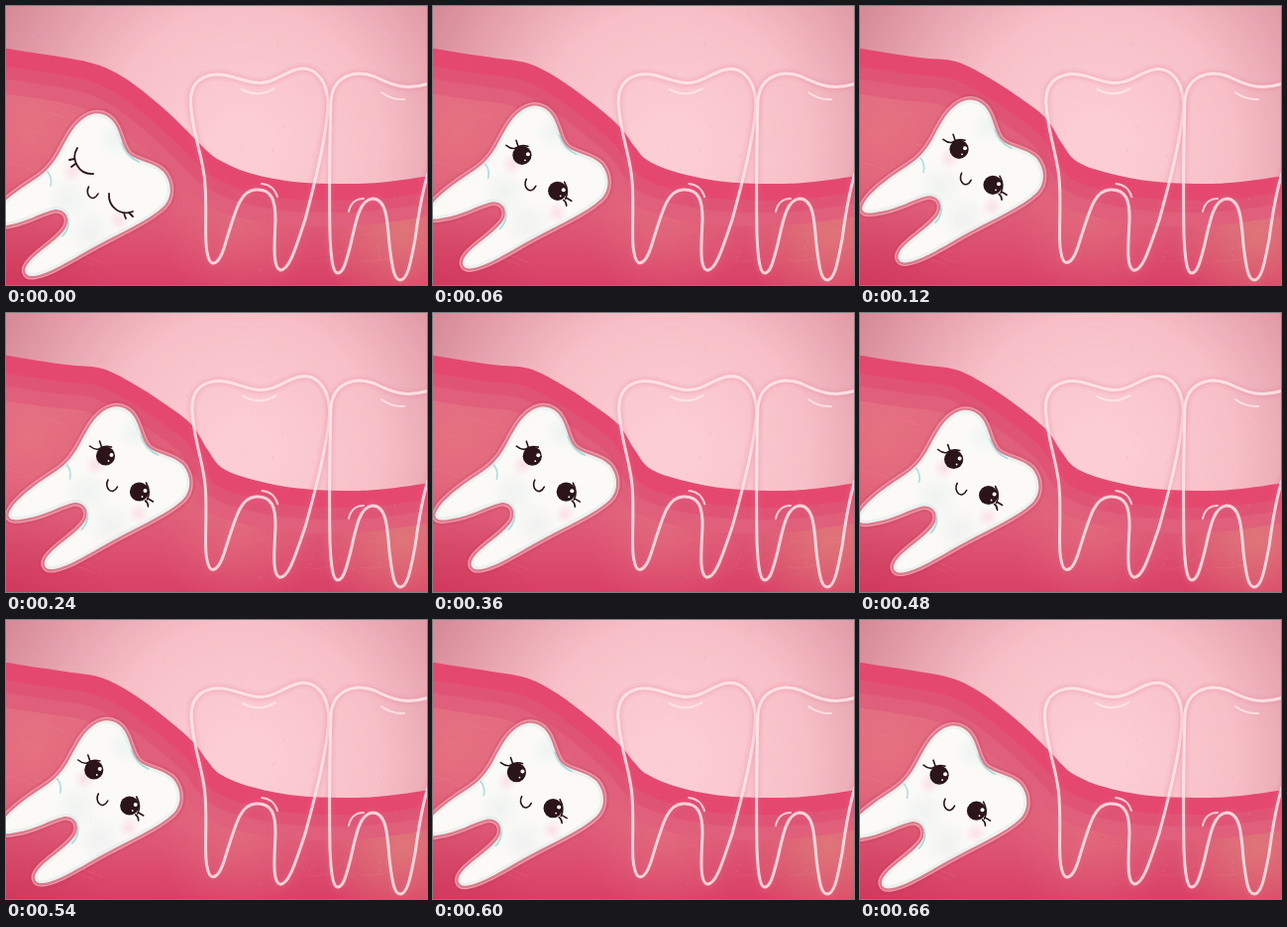
Write an HTML page with a canvas that moves like this. It is 425 px wide and 281 px high and loops after 0.69 s.

```html
<!DOCTYPE html>
<html>
<head>
<meta charset="utf-8">
<style>
  html, body { margin: 0; width: 100%; height: 100%; overflow: hidden; background: #f3b3bc; }
  canvas { display: block; width: 425px; height: 281px; }
</style>
</head>
<body>
<canvas id="stage" width="425" height="281"></canvas>
<script>
const W = 425, H = 281, LOOP = 690, STEP = 30;
const ctx = document.getElementById('stage').getContext('2d');

// How far the tooth has pushed up, as [time, amount]
const push = [[0, 0], [60, .55], [120, .98], [240, 1], [360, .99], [420, .92], [480, .75], [540, .5], [660, .13], [690, 0]];

const gumRest = [[-30, 38], [20, 46], [60, 52], [95, 60], [125, 76], [160, 104], [190, 133], [203, 146], [215, 155], [245, 168], [290, 177], [340, 179], [385, 177], [455, 167]];
const gumPushed = [[-30, 38], [20, 46], [60, 52], [97, 56], [128, 71], [158, 90], [187, 112], [203, 137], [218, 156], [246, 167], [290, 176], [340, 179], [385, 177], [455, 167]];

const ghostA = new Path2D('M203 248Q205 259 209 259Q215 259 220 244C232 205 236 186 252 185C268 184 272 195 272 215C271 240 269 264 277 266C286 266 292 245 302 215C314 170 326 120 325 95C323 70 308 60 293 64C278 68 268 80 250 77C232 74 220 66 205 70C190 74 184 85 187 105C190 135 200 155 201 180C203 210 200 235 203 248Z');
const ghostB = new Path2D('M430 77C405 86 390 80 372 71C350 63 330 72 328 95C327 130 326 180 327 230C328 255 330 269 335 269C341 269 344 255 348 240C354 212 358 195 370 194C384 194 385 215 387 240C390 265 392 276 398 276C406 276 409 255 413 235C417 205 421 180 429 160');
const shineA = new Path2D('M238 84Q255 93 271 83M258 179Q270 180 274 192');
const shineB = new Path2D('M379 87Q390 95 402 94M346 207Q349 194 361 194');
const tooth = new Path2D('M-17 218C-16 206 8 188 30 174C52 160 55 142 67 125C77 111 90 104 102 111C116 119 115 140 124 149C133 157 149 157 159 167C168 178 168 193 159 202C144 216 116 228 94 240C66 255 44 270 28 272C19 273 16 266 24 257C36 244 55 234 61 222C65 211 58 204 49 205C35 208 18 219 0 221C-10 223 -16 223 -17 218Z');
const creases = new Path2D('M117 138Q122 152 134 157M42 167Q47 173 45 181M61 211Q66 223 57 232');

function mix(a, b, p) { return a + (b - a) * p; }

function random(seed) {
  return () => (seed = (seed * 16807) % 2147483647) / 2147483647;
}

function amountAt(t) {
  const i = push.findIndex(k => k[0] > t);
  const [t0, a] = push[i - 1], [t1, b] = push[i];
  return mix(a, b, (t - t0) / (t1 - t0));
}

function stroke(path, color, width) {
  ctx.strokeStyle = color;
  ctx.lineWidth = width;
  ctx.stroke(path);
}

function glow(x, y, r, rgb, alpha) {
  const g = ctx.createRadialGradient(x, y, 0, x, y, r);
  g.addColorStop(0, `rgba(${rgb},${alpha})`);
  g.addColorStop(1, `rgba(${rgb},0)`);
  ctx.fillStyle = g;
  ctx.fillRect(x - r, y - r, 2 * r, 2 * r);
}

function gumPath(p, dx, dy) {
  const pts = gumRest.map(([x, y], i) => [mix(x, gumPushed[i][0], p) + dx, mix(y, gumPushed[i][1], p) + dy]);
  const path = new Path2D();
  path.moveTo(...pts[0]);
  for (let i = 0; i < pts.length - 1; i++) {
    const a = pts[i - 1] || pts[i], b = pts[i], c = pts[i + 1], d = pts[i + 2] || c;
    path.bezierCurveTo(b[0] + (c[0] - a[0]) / 6, b[1] + (c[1] - a[1]) / 6,
      c[0] - (d[0] - b[0]) / 6, c[1] - (d[1] - b[1]) / 6, c[0], c[1]);
  }
  path.lineTo(460, 300);
  path.lineTo(-40, 300);
  path.closePath();
  return path;
}

function drawBackground() {
  const g = ctx.createRadialGradient(240, 140, 30, 240, 140, 270);
  g.addColorStop(0, '#fccdd3');
  g.addColorStop(.45, '#f7bfc7');
  g.addColorStop(1, '#d78b99');
  ctx.fillStyle = g;
  ctx.fillRect(0, 0, W, H);
}

function drawGum(p) {
  ctx.fillStyle = '#e5486f';
  ctx.fill(gumPath(p, 0, 0));
  ctx.fillStyle = '#df5475';
  ctx.fill(gumPath(p, -6, 17));
  ctx.fillStyle = '#e05f7b';
  ctx.fill(gumPath(p, -11, 29));

  const body = gumPath(p, -17, 43);
  const g = ctx.createLinearGradient(0, 90, 0, H);
  g.addColorStop(0, '#e26a80');
  g.addColorStop(.6, '#df5d79');
  g.addColorStop(1, '#d94067');
  ctx.fillStyle = g;
  ctx.fill(body);

  ctx.save();
  ctx.clip(body);
  glow(400, 232, 85, '224,150,125', .5);
  glow(235, 225, 80, '232,135,135', .35);
  glow(25, 130, 75, '235,130,130', .4);
  glow(0, H, 110, '190,45,70', .35);
  const rnd = random(41);
  ctx.lineWidth = .8;
  for (let i = 0; i < 45; i++) {
    const x = rnd() * W, y = 90 + rnd() * 170, l = 8 + rnd() * 22;
    ctx.strokeStyle = `rgba(255,175,165,${.06 + rnd() * .12})`;
    ctx.beginPath();
    ctx.moveTo(x, y);
    ctx.quadraticCurveTo(x + l / 2, y + l * .1, x + l, y + l * (x < 250 ? .35 : -.1));
    ctx.stroke();
  }
  ctx.restore();
}

function drawSpecks() {
  const rnd = random(7);
  ctx.lineWidth = .7;
  for (let i = 0; i < 55; i++) {
    const x = rnd() * W, y = rnd() * H;
    ctx.strokeStyle = i % 2 ? 'rgba(200,90,115,.2)' : 'rgba(255,220,220,.2)';
    ctx.beginPath();
    ctx.moveTo(x, y);
    ctx.lineTo(x + rnd() * 4 - 2, y + rnd() * 3);
    ctx.stroke();
  }
}

function drawGhost(path, shine) {
  stroke(path, 'rgba(225,110,135,.07)', 12);
  stroke(path, 'rgba(225,110,135,.1)', 7);
  stroke(path, 'rgba(255,234,235,.84)', 3);
  stroke(shine, 'rgba(255,234,235,.8)', 2);
}

function drawOpenEye(x, y, lashes) {
  ctx.fillStyle = '#2b1519';
  ctx.beginPath();
  ctx.arc(x, y, 9.6, 0, 7);
  ctx.fill();
  ctx.fillStyle = '#fff';
  for (const [dx, dy, r] of [[6, -1, 2], [3, 5, .9]]) {
    ctx.beginPath();
    ctx.arc(x + dx, y + dy, r, 0, 7);
    ctx.fill();
  }
  ctx.save();
  ctx.translate(x, y);
  stroke(new Path2D(lashes), '#2b1519', 1.6);
  ctx.restore();
}

function drawTooth(p, open) {
  ctx.save();
  ctx.translate(19.5 * p, -14 * p);
  stroke(tooth, 'rgba(190,45,85,.16)', 12);
  stroke(tooth, '#ee9dab', 7);
  stroke(tooth, '#dd7a8d', 4.6);
  ctx.fillStyle = '#fbfaf7';
  ctx.fill(tooth);

  ctx.save();
  ctx.clip(tooth);
  stroke(tooth, 'rgba(195,210,212,.25)', 6);
  glow(62, 195, 24, '190,215,215', .2);
  glow(110, 135, 18, '190,220,220', .2);
  glow(85, 228, 26, '215,222,225', .3);
  glow(67 + 4 * p, 167, 11, '250,165,185', .3);
  glow(114, 216, 11, '250,165,185', .3);
  stroke(creases, 'rgba(125,205,205,.6)', 1.7);
  ctx.restore();

  if (open) {
    drawOpenEye(77 + 4 * p, 158, 'M-16 -10Q-11 -6 -7 -7Q-2 -11 6 -9M-6 -15L-4 -9');
    drawOpenEye(115, 194, 'M7 -9Q12 0 8 8M9 7L14 10M6 9Q9 11 9 15');
  } else {
    stroke(new Path2D('M72 143C65 154 73 170 88 169M69 154L64 155M70 159L66 162M104 189C103 201 114 212 128 207M119 209L121 214M124 208L128 212'), '#2b1519', 1.8);
  }
  stroke(new Path2D('M83.500 182C79 190 88 199 93 189'), '#2b1519', 1.6);
  ctx.restore();
}

function draw(t) {
  const p = amountAt(t);
  drawBackground();
  drawGum(p);
  drawSpecks();
  drawTooth(p, t >= 60);

  ctx.save();
  ctx.translate(255, 220);
  ctx.rotate(.012 * p);
  ctx.translate(-255, -220);
  drawGhost(ghostA, shineA);
  ctx.restore();
  drawGhost(ghostB, shineB);
}

function tick() {
  const t = performance.now() % LOOP;
  draw(Math.floor(t / STEP) * STEP);
  requestAnimationFrame(tick);
}

ctx.lineCap = ctx.lineJoin = 'round';
tick();
</script>
</body>
</html>
```
